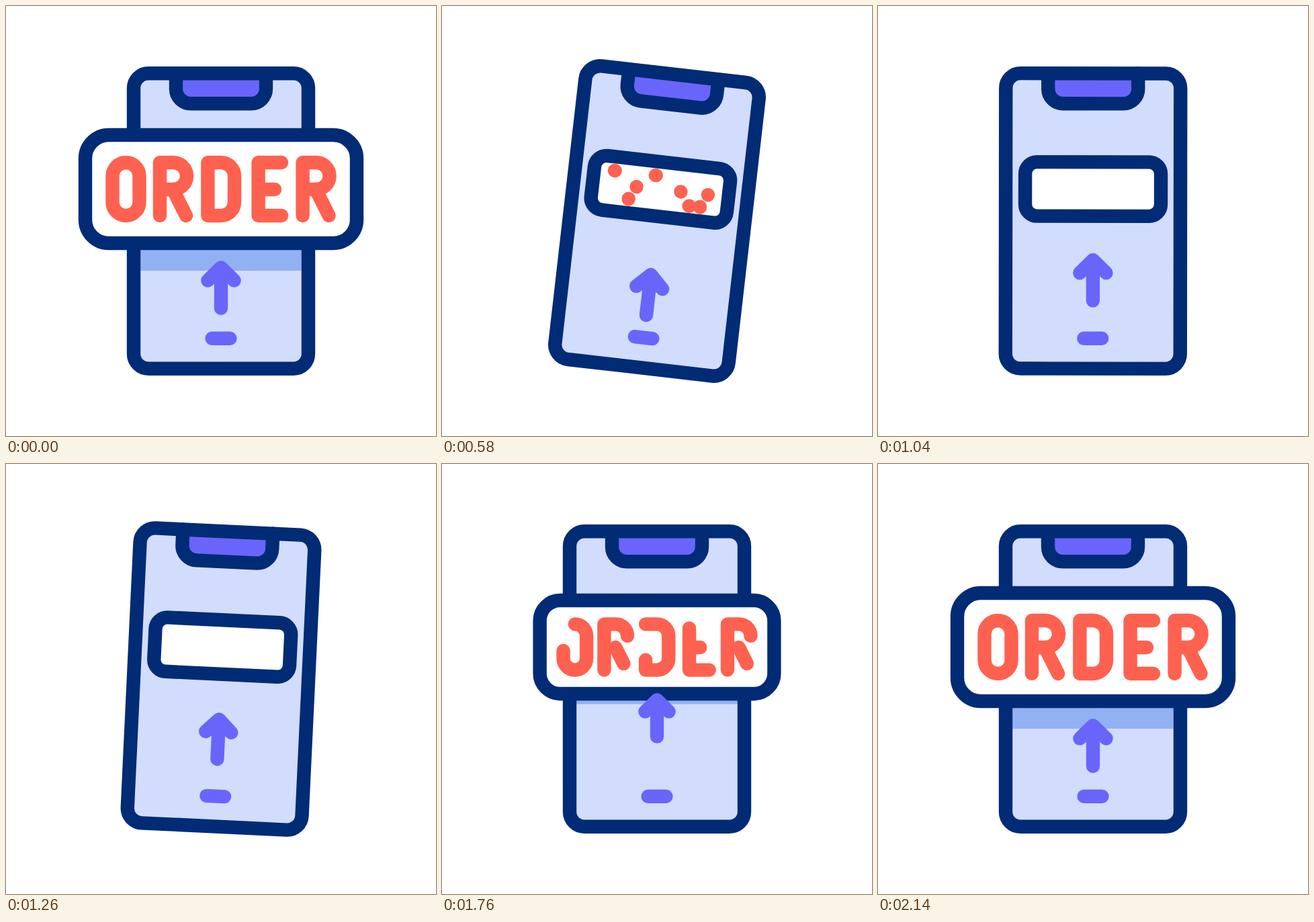
An HTML page that plays this animation: 640x640 px, repeating every 2.4 s.

```html
<!DOCTYPE html>
<html lang="en">
<head>
<meta charset="utf-8">
<title>Order</title>
<style>
  html, body { margin: 0; width: 100%; height: 100%; overflow: hidden; background: #fff; }
  svg { display: block; width: 100%; height: 100%; }
  .line { fill: none; stroke-width: 20.4; stroke-linecap: round; stroke-linejoin: round; }
  .navy { stroke: #022b76; }
  .violet { stroke: #6a65fa; }
</style>
</head>
<body>
<svg viewBox="0 0 640 640" role="img" aria-label="ORDER">
  <g id="phone">
    <rect x="190" y="100.3" width="260" height="439.4" rx="22" fill="#d2ddfd"/>
    <rect id="shade" x="190" y="300" width="260" fill="#92b1f3"/>
    <path class="line navy" style="fill:#6a65fa" d="M253 100.3V123a22 22 0 0 0 22 22.3H365a22 22 0 0 0 22-22.3V100.3"/>
    <rect class="line navy" x="190" y="100.3" width="260" height="439.4" rx="22"/>
    <path class="line violet" d="M306.6 494.7H333.4"/>
    <g id="banner" class="line">
      <rect class="navy" x="118" y="192" width="404" height="161" rx="35" fill="#fff"/>
      <g id="letters" stroke="#ff6150"></g>
    </g>
    <path id="arrow" class="line violet"/>
  </g>
</svg>
<script>
const LOOP = 2400, STEP = 20, STROKE = 20.4;
// Moments: banner fully shrunk, arrow hits it, banner fully popped out, all at rest.
const SHRUNK = 600, HIT = 1540, POPPED = 1905, REST = 2140;
const el = id => document.getElementById(id);

const rStrokes = x => [
  `M${x} 312V233h20a20 20 0 0 1 0 40h-20`,
  `M${x + 19.4} 273L${x + 39} 312`
];
const strokes = [
  'M178.5 233a20 20 0 0 1 20 20v39a20 20 0 0 1-40 0v-39a20 20 0 0 1 20-20',
  ...rStrokes(229),
  'M300.4 233H320a20 20 0 0 1 20 20v39a20 20 0 0 1-20 20H300.4V233',
  'M410 312H375.6V233H410',
  'M380 273H400',
  ...rStrokes(441.6)
];
el('letters').innerHTML = strokes.map(d => `<path pathLength="1" d="${d}"/>`).join('');

// Eased 0 to 1 between two moments.
function ramp(t, from, to) {
  const p = Math.min(1, Math.max(0, (t - from) / (to - from)));
  return p * p * (3 - 2 * p);
}

// Sine arcs of the given length, zero outside them.
const arcs = (t, start, length, count) =>
  t < start || t > start + length * count ? 0 : Math.sin(Math.PI * (t - start) / length);

// Three swings to alternating sides, each weaker, then upright.
function tiltAt(t) {
  const firstPeak = 510, gap = 335, swings = 3;
  let peak = 8, angle = peak * ramp(t, 90, firstPeak);
  for (let i = 0; i < swings; i++) {
    const next = i < swings - 1 ? peak * -0.63 : 0;
    const start = firstPeak + i * gap;
    angle += (next - peak) * ramp(t, start, start + gap);
    peak = next;
  }
  return angle;
}

const sizeAt = t => 1
  + .1 * ramp(t, 0, 140) - .6 * ramp(t, 140, SHRUNK)
  - .08 * ramp(t, HIT - 140, HIT) + .68 * ramp(t, HIT, POPPED)
  - .1 * ramp(t, POPPED, REST);

// 1 while the banner is out, 0 while it is tucked in.
const shown = (t, leave, enter) => 1 - ramp(t, leave, SHRUNK) + ramp(t, enter, POPPED);

function draw(t) {
  el('phone').setAttribute('transform', `rotate(${tiltAt(t)} 320 320)`);
  el('shade').setAttribute('height', Math.max(0, 105 * shown(t, 175, HIT) - 11));

  const size = sizeAt(t), trim = shown(t, 205, HIT - 50);
  el('banner').setAttribute('transform', `translate(320 272.5) scale(${size}) translate(-320 -272.5)`);
  el('banner').style.strokeWidth = STROKE / size;
  el('letters').style.display = trim > 0 ? '' : 'none';
  el('letters').style.strokeDasharray = trim < 1 ? `${trim} 2` : 'none';

  const push = ramp(t, 1200, HIT) - ramp(t, HIT, POPPED);
  const k = 1 - .1 * arcs(t, 0, 560, 1) - .29 * push;
  const y = 419.5 - 12.4 * arcs(t, 90, 360, 3) - 118 * push;
  const point = (dx, dy) => `${320 + dx * k} ${y + dy * k}`;
  const tip = point(0, -30.3);
  el('arrow').setAttribute('d',
    `M${point(-19.6, -11)}L${tip}L${point(19.6, -11)}M${tip}L${point(0, 30.3)}`);
}

function tick() {
  const t = performance.now() % LOOP;
  draw(Math.floor(t / STEP) * STEP);
  requestAnimationFrame(tick);
}
tick();
</script>
</body>
</html>
```
